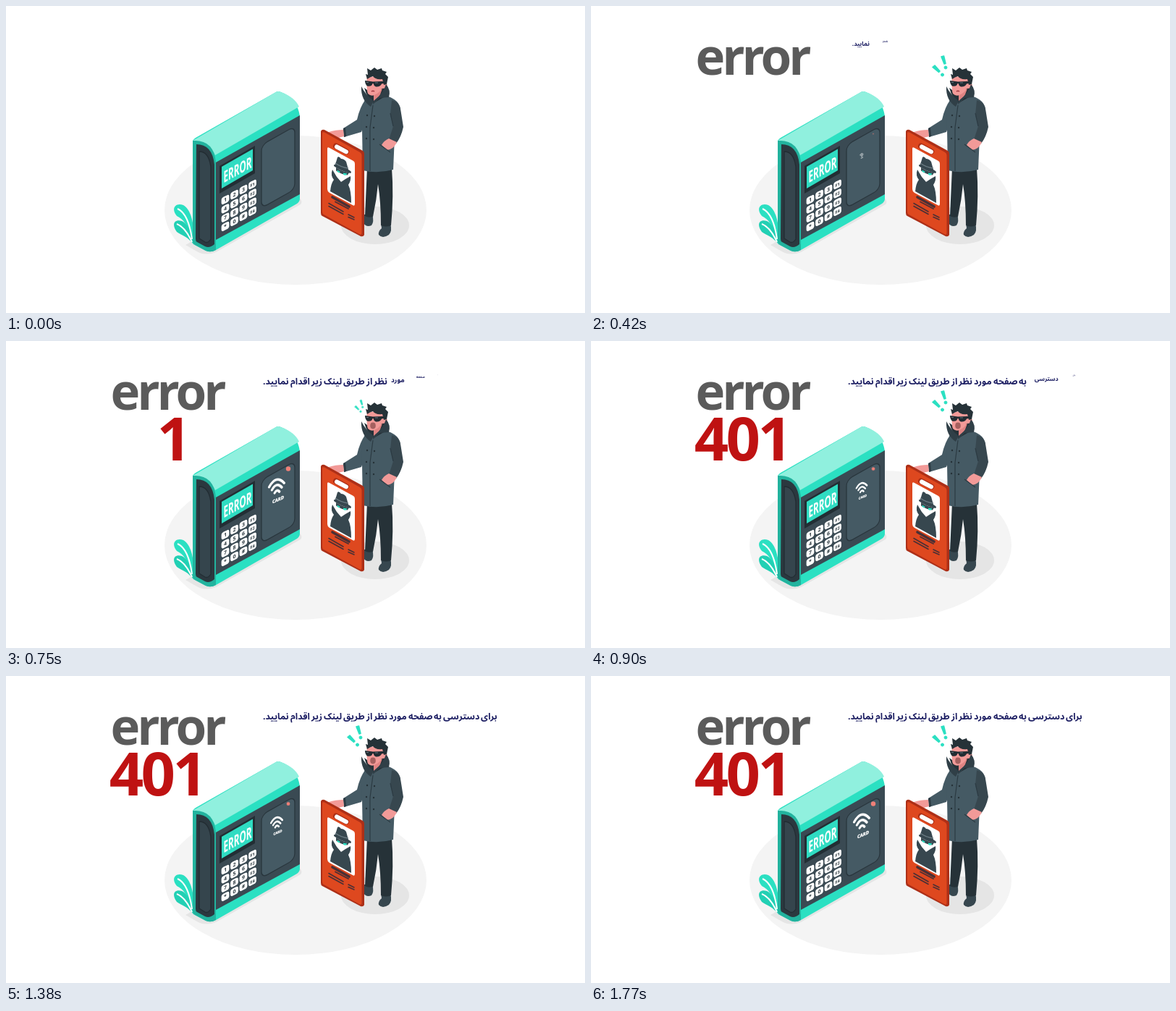
Animation, 800 px wide and 424 px high, one loop 1800 ms. Source, as an HTML page:

```html
<!DOCTYPE html>
<html lang="en">
<head>
<meta charset="utf-8">
<title>Error 401</title>
<style>
html, body { margin: 0; width: 100%; height: 100%; overflow: hidden; background: #fff; }
#stage { position: relative; width: 800px; height: 424px; overflow: hidden; }
svg { position: absolute; left: 0; top: 0; }
svg text { font-family: "Open Sans", "Noto Sans", sans-serif; font-weight: 700; }

.title {
  position: absolute; transform: translateX(-50%);
  font-family: "Open Sans", "Noto Sans", sans-serif; font-weight: 700;
  line-height: 0; white-space: nowrap;
}
#word { left: 222.5px; top: 68px; font-size: 69px; letter-spacing: -4px; color: #5b5b5b; }
#code { left: 208.5px; top: 132.500px; font-size: 83px; letter-spacing: -3.5px; color: #bf1212; }

#note {
  position: absolute; left: 355px; top: 56px; line-height: 0; font-size: 14px;
  font-family: "Noto Sans Arabic", "DejaVu Sans", sans-serif; font-weight: 700;
  color: #1d1f63; white-space: nowrap; word-spacing: -.1em;
}
#note span { display: inline-block; transform-origin: 50% 0; }

.pulse, #marks, #open, #shut { animation: 1.8s linear infinite; }
.pulse { animation-name: pulse; }
#marks { animation-name: alert; transform-origin: 497px 101px; }
#open { animation-name: gasp; transform-origin: 507px 117px; }
#shut { animation-name: hush; }
#sign { transform-origin: 374px 207px; }
#lamp { transform-origin: 390px 176.5px; }

@keyframes pulse {
  0% { transform: scale(0); }
  11.7%, 15% { transform: scale(1); }
  25.7% { transform: scale(0); }
  38.3%, 45% { transform: scale(1); }
  61.7% { transform: scale(0); }
  81.7%, 100% { transform: scale(1); }
}
@keyframes alert {
  0% { transform: scale(0); }
  15%, 26.7% { transform: scale(1); }
  35% { transform: scale(0); }
  46%, 100% { transform: scale(1); }
}
@keyframes gasp {
  0%, 28% { transform: scale(0); }
  36%, 100% { transform: scale(1); }
}
@keyframes hush {
  0%, 28% { opacity: 1; }
  32%, 100% { opacity: 0; }
}
</style>
</head>
<body>
<div id="stage">
<svg width="800" height="424" viewBox="0 0 800 424">
  <!-- floor and shadows -->
  <ellipse cx="400" cy="282" rx="181" ry="103" fill="#f4f4f4"/>
  <ellipse cx="510" cy="303" rx="47" ry="26" fill="#e5e5e5"/>
  <path d="M248 330 L262 322 L400 262 Q412 268 407 274 L290 340 Q274 346 262 338 Z" fill="#e5e5e5"/>

  <!-- plant -->
  <path d="M258 326 C252 306 247 295 236 290 C227 279 235 271 245 275 C257 282 260 303 260 328 Z" fill="#2be0c2"/>
  <path d="M259 329 C249 317 246 319 236 312 C228 301 233 294 243 297 C253 302 257 317 260 330 Z" fill="#22d0b4"/>
  <path d="M237 280 C248 285 254 300 257 322 M236 301 C246 305 252 315 257 326" fill="none" stroke="#fff" stroke-width="2"/>

  <!-- reader -->
  <path d="M258 186 Q259 184 262 182 L372 119.500 Q376 117 380 119 Q402 127 406 152 V266 Q406 270 402 273 L290 337 Q283 341 276 338 L261 330 Q258 328 258 325 Z" fill="#2be0c2"/>
  <path d="M258 186 L372 119.500 Q376 117 380 119 Q399 126 405 139 L289 206 Q281 187 258 186 Z" fill="#90f0de"/>
  <path d="M258 186 Q287 184 290 216 V337 Q283 341 276 338 L261 330 Q258 328 258 325 Z" fill="#22b39e"/>
  <path d="M263 191 Q285 191 288 219 V329 Q281 335 275 332 L264 326 Q262 325 262 322 Z" fill="#2b383f"/>
  <path d="M267 201 Q280 201 283 222 V322 Q279 328 275 326 L267 321 Z" fill="#35454d" stroke="#222d33" stroke-width="1.3"/>
  <path d="M290 216 L406 151 V260 L290 323 Z" fill="#3a4a53"/>

  <!-- display -->
  <path d="M295 221 L344 193 V231 L295 259 Z" fill="#222e34"/>
  <path d="M298 222 L341 197.500 V227 L298 252 Z" fill="#2fdcc2"/>
  <text transform="matrix(.53 -.295 0 1 300.500 244.500)" font-size="22" fill="#fff">ERROR</text>

  <g id="keys" fill="#2b383f" text-anchor="middle"></g>

  <!-- card pad -->
  <rect transform="matrix(1 -.56 0 1 353 192)" width="46" height="87" rx="8" fill="#455a64" stroke="#29363d" stroke-width="1.3"/>
  <g id="sign" class="pulse">
    <g transform="matrix(.95 -.25 .05 1 374.500 209)" fill="none" stroke="#fff" stroke-width="3.4" stroke-linecap="round">
      <path d="M-11 -10 Q0 -25 11 -10 M-7.200 -5 Q0 -15 7.200 -5 M-3.500 0 Q0 -5 3.500 0"/>
    </g>
    <text transform="matrix(.95 -.4 0 1 368 224.500)" font-size="6.200" fill="#fff" stroke="#fff" stroke-width=".4">CARD</text>
  </g>
  <circle id="lamp" class="pulse" cx="390" cy="176.500" r="3.200" fill="#f08078"/>

  <!-- legs and shoes -->
  <path d="M495 288 L506 287 Q509 298 505 303 Q498 306 494 300 Z" fill="#37474f"/>
  <path d="M518 300 L531 300 Q534 311 529 316 Q520 322 515 316 Q514 311 519 307 Z" fill="#37474f"/>
  <path d="M499 224 L533 224 Q536 262 532 303 Q525 306 518 303 Q518 270 514 246 Q512 268 507 291 Q500 293 496 290 Z" fill="#263238"/>

  <!-- coat -->
  <path d="M497 129 Q489 139 485 157 L466 169 L467 181 L491 174 L500 150 Z" fill="#455a64"/>
  <path d="M466 169 L469 168 L470 180 L467 181 Z" fill="#2c3b43"/>
  <path d="M446 174 Q455 171 466 171 L467 180 Q458 183 452 182 Q443 179 446 174 Z" fill="#f29a98"/>
  <path d="M496 129 L528 125 Q543 130 545 142 L537 180 L535 226 Q513 232 493 227 L492 170 Q489 145 496 129 Z" fill="#455a64"/>
  <path d="M533 130 Q544 132 545.500 145 L549 167 Q546 181 539 190 L529 185 L535 166 L531 150 Z" fill="#37474f"/>
  <path d="M529 183 L540 188 Q536 198 526 199 L519 192 Q522 186 529 183 Z" fill="#f29a98"/>
  <path d="M516 191 L531 202 M507 137 L503 168 L503 228 M531 148 L535 166" fill="none" stroke="#2c3b43" stroke-width="1.2"/>
  <g fill="#263238">
    <circle cx="499" cy="151" r="1.200"/><circle cx="509" cy="152" r="1.200"/>
    <circle cx="498" cy="167" r="1.200"/><circle cx="508" cy="168" r="1.200"/>
    <circle cx="498" cy="183" r="1.200"/><circle cx="508" cy="184" r="1.200"/>
  </g>

  <!-- head -->
  <path d="M495 113 L503 119 L524 109 L529 122 L508 134 Q499 128 495 113 Z" fill="#263238"/>
  <path d="M508 120 L520 114 L516 125 L508 132 Z" fill="#e08483"/>
  <path d="M498.500 99 Q498 116 500 121 Q504 125 509 123 Q516 120 519 114 Q527 114 527 109 Q526 105 522 107 L521 95 Z" fill="#f29a98"/>
  <path d="M491 111 Q496 122 508 131 L504 139 Q490 130 491 111 Z" fill="#303f47"/>
  <path d="M525 108 Q532 116 529 126 L516 127 L507 136 L508 131 Q522 120 525 108 Z" fill="#303f47"/>
  <path d="M499 101 L497 94 L500 95 L499 86 L504 89 L509 85 L513 88 L519 86 L520 89 L526 91 L524 94 L528 98 L526 108 L522 109 L520 101 Q510 102 507 97 Q503 98 499 101 Z" fill="#263238"/>
  <path d="M496 103 L507 104.500 L520 104 L526 106 L519 107.500 Q517 112 511 111.500 Q508 110 507.500 107 L506.500 107 Q505 112 499 110.500 Q496 108 496 103 Z" fill="#222c32"/>
  <path d="M498 105.500 L501 105.500 M510 106 L514 106" stroke="#61737c" stroke-width="1"/>
  <path id="shut" d="M505 118 Q507 116.500 509 118" fill="none" stroke="#a33b42" stroke-width="1.600"/>
  <ellipse id="open" cx="507" cy="117" rx="3.800" ry="4.400" fill="#a5605f"/>

  <g id="marks" fill="#2be0c2" stroke="#2be0c2" stroke-linejoin="round">
    <path d="M472 84.500 L475 82 L482 90 L480.500 91.500 Z M484 70 L487.500 69 L490 79.500 L488 80 Z" stroke-width="1.600"/>
    <circle cx="485.500" cy="95" r="2"/><circle cx="490" cy="85" r="2"/>
  </g>

  <!-- badge -->
  <path d="M435 173 Q436 170 440 171 L493 200 Q495 201 495 204 V316 Q494 319 490 318 L437 290 Q435 289 435 286 Z" fill="#ad2f17"/>
  <path d="M437 176 Q437 173 440 174.500 L489 202 Q491.500 203.500 491.500 206 V314 Q491 317 488 315 L439 288 Q437 287 437 284 Z" fill="#de481f"/>
  <path d="M456 193.500 L470 201" stroke="#ad2f17" stroke-width="8" stroke-linecap="round"/>
  <path d="M457 194.500 L470 201.300" stroke="#fff" stroke-width="6" stroke-linecap="round"/>
  <path d="M444 197 Q444 194 447 196 L480 214 Q482 215 482 218 V273 Q482 277 479 275 L447 258 Q444 256 444 253 Z" fill="#fff"/>
  <g fill="#37474f">
    <path d="M455 219 L458 209 Q460 207 463 211 Q467 211 470 215 L473 226 Q479 229 476 231 Q462 228 453 221 Q453 218 455 219 Z"/>
    <path d="M451 226 L457 236 L463 243 L469 239 L476 235 Q477 241 473 247 Q477 255 477 272 L448 256 Q449 245 453 240 Q448 234 451 226 Z"/>
    <path d="M456 223 Q465 229 474 230 L472 233.500 Q464 233 456 227.500 Z"/>
  </g>
  <path d="M457.500 226.500 L462 229 Q459 231.500 457.500 228 Z M466 230.500 L471.500 231.500 Q469 235.500 466 232.500 Z" fill="#2be0c2"/>
  <path d="M455 217 Q463 223 473 224" fill="none" stroke="#6d7d85" stroke-width="1.300"/>
  <g fill="none" stroke="#4a3035" stroke-linecap="round">
    <path d="M451 264 L474 277" stroke-width="3.600"/>
    <path d="M455 270.500 L473 280" stroke-width="1.800"/>
    <path d="M446 272.500 L466 284 M446 276.500 L466 287.500 M473 288 L481 292 M473 291.500 L481 295" stroke-width="1.600"/>
  </g>
</svg>

<div id="word" class="title">error</div>
<div id="code" class="title">401</div>
<div id="note" dir="rtl" lang="fa">برای دسترسی به صفحه مورد نظر از طریق لینک زیر اقدام نمایید.</div>
</div>

<script>
const LOOP = 1800;
const $ = id => document.getElementById(id);
const timing = { duration: LOOP, iterations: Infinity };

// Keypad, sheared onto the front face
const labels = "1 2 3 F1 4 5 6 F2 7 8 9 F3 * 0 # F4".split(" ");
$("keys").innerHTML = labels.map((label, i) => {
  const col = i % 4, row = i >> 2;
  const x = 303 + col * 12.5, y = 267.5 + row * 12.3 - col * 7;
  return `<g transform="matrix(1 -.5 0 1 ${x} ${y})">
    <rect x="-5.4" y="-5" width="10.8" height="10" rx="3.2" fill="#fff"/>
    <text y="2.5" font-size="${label.length > 1 ? 5.6 : 7}">${label}</text></g>`;
}).join("");

function split(el, parts, joint) {
  el.innerHTML = parts.map(part => `<span>${part}</span>`).join(joint);
  return [...el.children];
}

// Letters are typed from the last to the first; each takes its room one step before it shows
function typeBack(id, start, step) {
  const el = $(id);
  const { fontSize, letterSpacing } = getComputedStyle(el);
  split(el, [...el.textContent], "").reverse().forEach((letter, i) => {
    const room = (start + i * step) / LOOP;
    const show = room + step / LOOP;
    const none = { fontSize: "0px", letterSpacing: "0px", opacity: 0 };
    const blank = { fontSize, letterSpacing, opacity: 0 };
    const full = { ...blank, opacity: 1 };
    letter.animate([
      { ...none, offset: 0 }, { ...none, offset: room },
      { ...blank, offset: room }, { ...blank, offset: show },
      { ...full, offset: show }, { ...full, offset: 1 }
    ], timing);
  });
}

// Words drop in as a wave from left to right
function dropWords(el, width) {
  const words = split(el, el.textContent.split(" "), " ");
  el.style.fontSize = 14 * width / el.offsetWidth + "px";
  words.forEach(word => {
    const end = 436 + (word.offsetLeft + word.offsetWidth / 2) / 0.53;
    const away = "translateY(-10px) scale(0)";
    word.animate([
      { transform: away, offset: 0 },
      { transform: away, offset: (end - 150) / LOOP },
      { transform: "none", offset: end / LOOP },
      { transform: "none", offset: 1 }
    ], timing);
  });
}

typeBack("word", 150, 50);
typeBack("code", 640, 80);
dropWords($("note"), 325);
</script>
</body>
</html>
```
